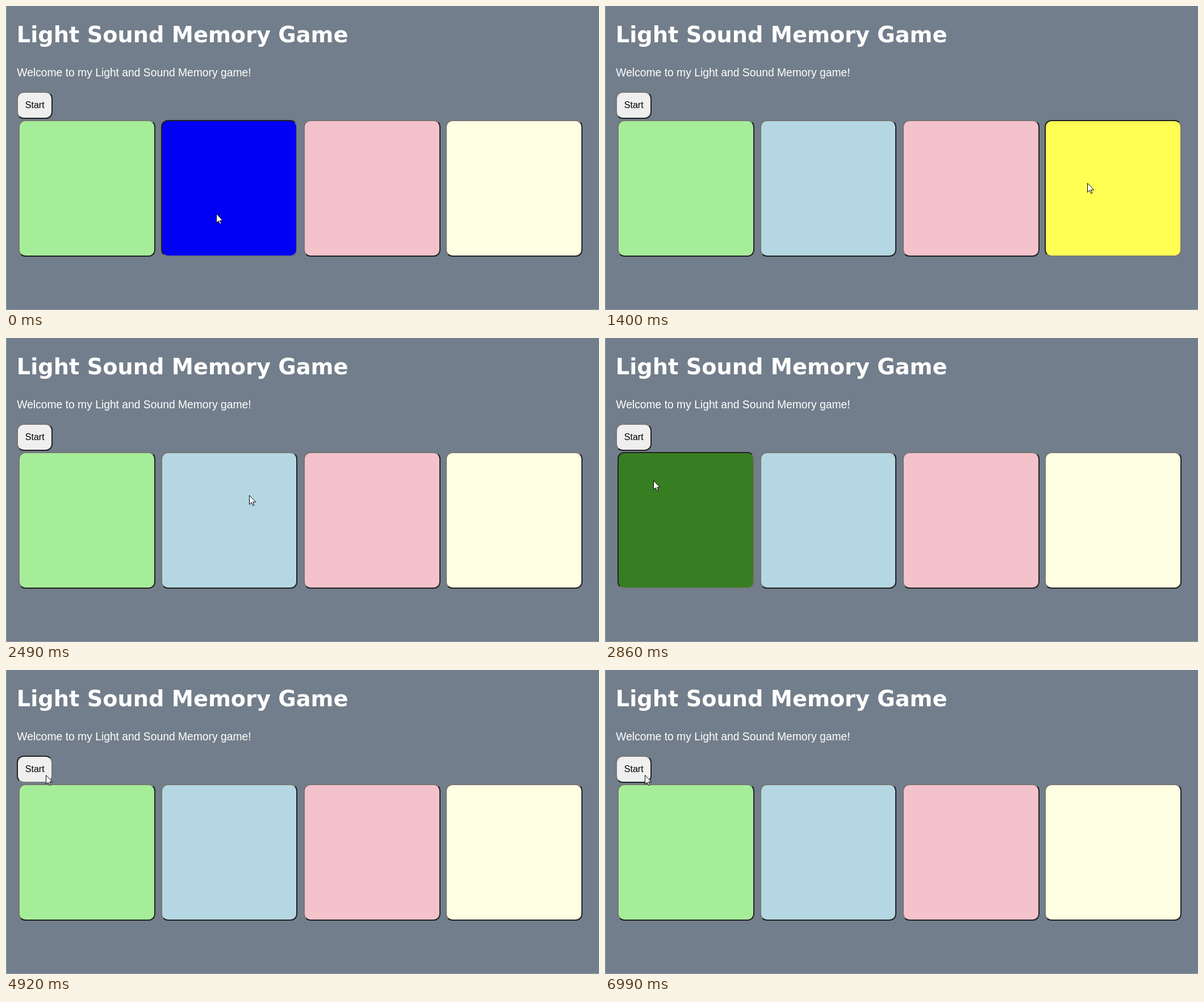
An HTML page for the animation above (8000 ms loop, 1044 by 536 pixels).

```html
<!DOCTYPE html>
<html lang="en">
<head>
<meta charset="utf-8">
<title>Light Sound Memory Game</title>
<style>
  html, body { margin: 0; width: 100%; height: 100%; overflow: hidden; background: #727e8b; }
  body { position: relative; }
  .edge { position: absolute; inset: 0; border: solid #9aa2aa; border-width: 0 0 1px 1px; }
  .btn {
    position: absolute; box-sizing: border-box; border: 2px solid; border-radius: 12px;
    border-color: #767676 #212121 #212121 #767676;
  }
  .btn.down { border-color: #212121 #767676 #767676 #212121; }
  .pad { top: 201px; width: 241px; height: 241px; }
  #start { left: 19px; top: 151px; width: 63px; height: 48px; background: #efefef; }
  svg { position: absolute; left: 0; top: 0; }
  text { font: 19.3px "Liberation Sans", Arial, sans-serif; fill: #fff; }
  .title { font: bold 38.3px "DejaVu Sans", Verdana, sans-serif; }
  .label { font-size: 16.1px; fill: #000; }
</style>
</head>
<body>
<div class="edge"></div>
<div id="start" class="btn"></div>
<svg width="1044" height="536">
  <text class="title" x="18.8" y="64">Light Sound Memory Game</text>
  <text x="19.3" y="124">Welcome to my Light and Sound Memory game!</text>
  <text class="label" x="33.7" y="180">Start</text>
  <path id="cursor" d="M.5 .5V16.5L4.2 13L6.7 18.6L9 17.6L6.6 12.2H11.6Z" fill="#fff" stroke="#000"/>
</svg>
<script>
const LOOP = 8000;
const start = document.getElementById("start");
const cursor = document.getElementById("cursor");

// lit: [from, to, held by the mouse]
const pads = [
  { x: 22, w: 241, dim: "#a6ed99", bright: "#377e22", lit: [[2800, 2930, true]] },
  { x: 273, w: 240, dim: "#b5d7e3", bright: "#0000f5", lit: [[0, 310, true]] },
  { x: 524, w: 241, dim: "#f4c2cb", bright: "#ea3323", lit: [[630, 1070, true], [2120, 2260, true]] },
  { x: 774, w: 241, dim: "#ffffe3", bright: "#ffff54", lit: [[1400, 1830, true], [5990, 6990, false]] }
];

// [first step, last step, number of steps, x, y]
const home = [370, 366];
const moves = [
  [450, 630, 5, 618, 345],
  [1070, 1400, 6, 849, 312],
  [1980, 2120, 4, 673, 295],
  [2260, 2790, 9, 85, 251],
  [3100, 3540, 9, 62, 152],
  [3590, 3810, 5, 49, 173],
  [3910, 4430, 10, 70, 185]
];

for (const pad of pads) {
  pad.el = document.createElement("div");
  pad.el.className = "btn pad";
  pad.el.style.left = pad.x + "px";
  pad.el.style.width = pad.w + "px";
  start.before(pad.el);
}

const ease = p => p * p * (3 - 2 * p);

function cursorAt(t) {
  let [x, y] = home;
  for (const [from, to, steps, endX, endY] of moves) {
    if (t < from) break;
    const step = Math.floor((t - from) / (to - from) * (steps - 1)) + 1;
    const p = ease(Math.min(1, step / steps));
    x += (endX - x) * p;
    y += (endY - y) * p;
  }
  return [Math.round(x), Math.round(y)];
}

// Five quick clicks, then a longer one
function startDown(t) {
  if (t >= 4920 && t < 5710) return Math.floor((t - 4920) / (790 / 9)) % 2 === 0;
  return t >= 6050 && t < 6250;
}

function draw(now) {
  const t = now % LOOP;
  for (const pad of pads) {
    const on = pad.lit.find(([from, to]) => t >= from && t < to);
    pad.el.style.background = on ? pad.bright : pad.dim;
    pad.el.classList.toggle("down", Boolean(on && on[2]));
  }
  start.classList.toggle("down", startDown(t));
  cursor.setAttribute("transform", `translate(${cursorAt(t)})`);
  requestAnimationFrame(draw);
}
draw(performance.now());
</script>
</body>
</html>
```
